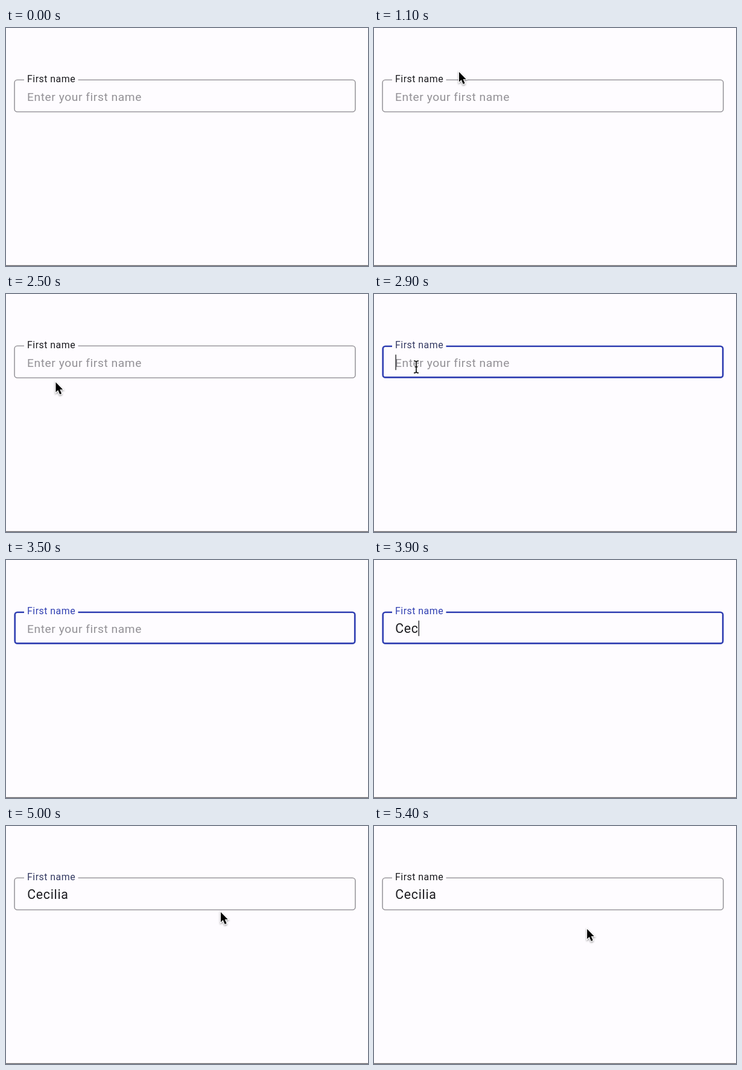
Animation, 600 px wide and 395 px high, one loop 6.3 s. Source, as an HTML page with a canvas:

```html
<!DOCTYPE html>
<html lang="en">
<head>
<meta charset="utf-8">
<title>Outlined text field</title>
<style>
  html, body { margin: 0; width: 100%; height: 100%; overflow: hidden; background: #fefcff; }
  canvas { display: block; width: 600px; height: 395px; }
</style>
</head>
<body>
<canvas id="stage"></canvas>
<script>
const W = 600, H = 395, LOOP = 6300, TICK = 100;
const INK = '#1b1b1f', GREY = '#87858b', HINT = '#939196', BLUE = '#3140b2', MIXED = '#343a62';
const NAME = 'Cecilia';

const canvas = document.getElementById('stage');
const ctx = canvas.getContext('2d');
const dpr = window.devicePixelRatio || 1;
canvas.width = W * dpr;
canvas.height = H * dpr;

// Pointer stops: time, shape, x, y
const pointer = [
  [0],
  [1100, arrow, 141, 73], [1200, arrow, 126, 56], [1400, arrow, 114, 72],
  [1500, beam, 101, 104], [1700, beam, 99, 103], [2400, beam, 89, 124],
  [2500, arrow, 82.5, 146.5], [2700, beam, 74, 126], [2800, beam, 70, 121],
  [3000, beam, 92, 117], [3100, beam, 180, 104], [3200, arrow, 282, 78],
  [3300, arrow, 335, 67], [3500],
  [4700, arrow, 337, 79], [4800, beam, 346, 108], [4900, arrow, 354, 140],
  [5000, arrow, 356, 143], [5100, arrow, 357, 144],
  [5300, arrow, 355, 158], [5400, arrow, 353.2, 171],
];
const strokes = [3600, 3800, 3900, 4100, 4200, 4400, 4500];
const between = (t, a, b) => t >= a && t < b;

function text(str, x, y, size, spacing, color) {
  ctx.font = `${size}px Roboto, sans-serif`;
  ctx.letterSpacing = spacing + 'px';
  ctx.fillStyle = color;
  ctx.fillText(str, x, y);
  return ctx.measureText(str).width;
}

function outline(color, width) {
  const h = width / 2, l = 13.4 + h, r = 579.6 - h, t = 85.4 + h, b = 139.8 - h;
  const rad = 5.4 - h;
  ctx.beginPath();
  ctx.moveTo(119.5, t);
  ctx.arcTo(r, t, r, b, rad);
  ctx.arcTo(r, b, l, b, rad);
  ctx.arcTo(l, b, l, t, rad);
  ctx.arcTo(l, t, r, t, rad);
  ctx.lineTo(30, t);
  ctx.strokeStyle = color;
  ctx.lineWidth = width;
  ctx.stroke();
}

function arrow() {
  const shape = new Path2D('M0 0V16.4L3.7 13L6.7 20L9.6 18.8L6.7 11.9H11.7Z');
  ctx.save();
  ctx.shadowColor = 'rgba(0,0,0,.4)';
  ctx.shadowBlur = 3 * dpr;
  ctx.shadowOffsetY = 1.5 * dpr;
  ctx.strokeStyle = '#fff';
  ctx.lineWidth = 2.4;
  ctx.stroke(shape);
  ctx.restore();
  ctx.fillStyle = '#000';
  ctx.fill(shape);
}

function beam() {
  const shape = new Path2D('M-4 -10Q0 -10 0 -7.5Q0 -10 4 -10M0 -7.5V7.5M-4 10Q0 10 0 7.5Q0 10 4 10M-2.4 0H2.4');
  for (const [color, width] of [['rgba(255,255,255,.85)', 3.6], ['#111', 1.7]]) {
    ctx.strokeStyle = color;
    ctx.lineWidth = width;
    ctx.stroke(shape);
  }
}

function draw(t) {
  const focused = between(t, 2900, 5000);
  const hovered = between(t, 1500, 2500) || between(t, 2700, 2900);
  const mixing = between(t, 2900, 3000) || between(t, 5000, 5100);
  const typed = NAME.slice(0, strokes.filter(s => t >= s).length);

  ctx.setTransform(dpr, 0, 0, dpr, 0, 0);
  ctx.fillStyle = '#fefcff';
  ctx.fillRect(0, 0, W, H);
  ctx.fillStyle = '#626065';
  ctx.fillRect(0, 393.7, W, 1.3);

  if (focused) outline(BLUE, 2.7);
  else outline(hovered ? INK : GREY, 1.35);
  text('First name', 35, 90.3, 16, 0.45, mixing ? MIXED : focused ? BLUE : INK);

  let caretX = 35.5;
  if (typed) caretX = 35.2 + text(typed, 35.2, 121, 21.33, 0.7, INK);
  else text('Enter your first name', 35, 121, 19.2, 0.58, HINT);
  if (focused && !between(t, 3400, 3600)) {
    ctx.fillStyle = INK;
    ctx.fillRect(caretX, 100.6, 1.35, 25.6);
  }

  const [, shape, x, y] = pointer.findLast(p => t >= p[0]);
  if (shape) {
    ctx.translate(x, y);
    shape();
  }
}

const start = performance.now();
function loop() {
  const t = (performance.now() - start) % LOOP;
  draw(Math.floor(t / TICK) * TICK);
  requestAnimationFrame(loop);
}
loop();
</script>
</body>
</html>
```
